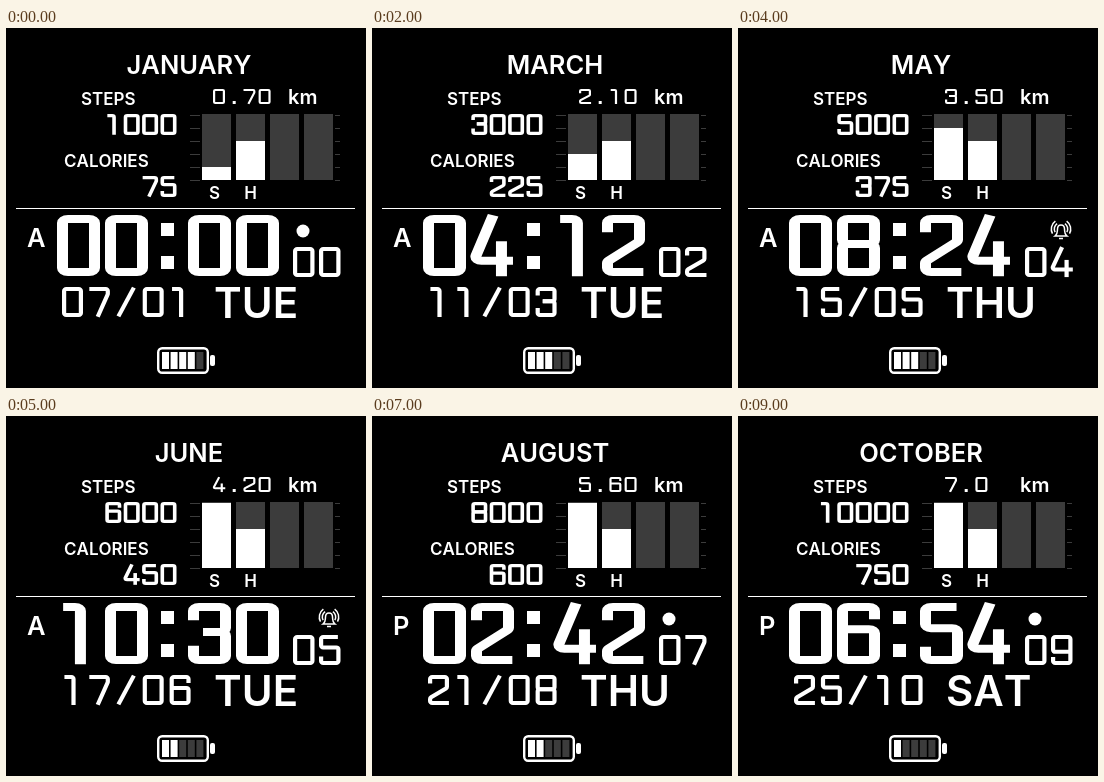
An HTML page with a canvas for the animation above (10 s loop, 360x360 px).

```html
<!DOCTYPE html>
<html lang="en">
<head>
<meta charset="utf-8">
<title>Watch face</title>
<style>
  html, body { margin: 0; width: 100%; height: 100%; overflow: hidden; background: #000; }
  canvas { display: block; width: 360px; height: 360px; }
</style>
</head>
<body>
<canvas id="face" width="360" height="360"></canvas>
<script>
const ctx = document.getElementById('face').getContext('2d');
const WHITE = '#fff', DIM = '#3c3c3c';
const STEP_MS = 1000, STEPS = 10;

const MONTHS = ['JANUARY', 'FEBRUARY', 'MARCH', 'APRIL', 'MAY', 'JUNE', 'JULY',
  'AUGUST', 'SEPTEMBER', 'OCTOBER'];
const DAYS = ['SUN', 'MON', 'TUE', 'WED', 'THU', 'FRI', 'SAT'];

// Square display digits: strokes as "x,y" points in a unit box, "z" closes a stroke.
const GLYPHS = {
  0: '.5,0 1,0 1,1 0,1 0,0 z',
  1: '.02,0 .56,0 .56,1.08',
  2: '0,.25 0,0 1,0 1,.42 0,.8 0,1 1.12,1',
  3: '0,.25 0,0 1,0 1,.47 .3,.47|.3,.47 1,.47 1,1 0,1 0,.73',
  4: '.52,-.07 -.02,.7 -.02,.79 1.14,.79|.78,.42 .78,1.08',
  5: '.97,0 0,0 0,.4 1,.4 1,1 0,1 0,.75',
  6: '1,.23 1,0 0,0 0,1 1,1 1,.42 0,.42',
  7: '-.1,0 1,0 1,.2 .4,1.07',
  8: '.5,0 1,0 1,.47 0,.47 0,0 z|.5,.47 1,.47 1,1 0,1 0,.47 z',
  9: '0,.77 0,1 1,1 1,0 0,0 0,.57 1,.57',
  '/': '.95,-.05 .03,1.05'
};

// w, h: digit size; sw, sh: weight of upright and level strokes.
const BIG = { w: 43, h: 61, sw: 11, sh: 8, pitch: 48 };
const DATE = { w: 21, h: 30, sw: 4.2, sh: 4, pitch: 26.9 };
const SECS = { w: 21.5, h: 30, sw: 4.2, sh: 4, pitch: 26 };
const COUNT = { w: 16, h: 21, sw: 3.6, sh: 3.2, pitch: 18.4 };
const SMALL = { w: 12, h: 15, sw: 2.2, sh: 2, pitch: 15.2 };

const pad = n => String(n).padStart(2, '0');

function rect(x, y, w, h, color = WHITE) {
  ctx.fillStyle = color;
  ctx.fillRect(x, y, w, h);
}

function text(str, x, y, size, align = 'left') {
  ctx.font = `600 ${size}px Inter, sans-serif`;
  ctx.fontKerning = 'none';
  ctx.textAlign = align;
  ctx.fillStyle = WHITE;
  ctx.fillText(str, x, y);
}

function glyph(ch, x, y, f) {
  ctx.save();
  ctx.translate(x, y);
  ctx.scale(f.sw, f.sh);
  ctx.lineWidth = 1;
  ctx.strokeStyle = WHITE;
  for (const stroke of GLYPHS[ch].split('|')) {
    const closed = stroke.endsWith('z');
    const pts = stroke.replace(' z', '').split(' ').map(p => {
      const [u, v] = p.split(',').map(Number);
      return [0.5 + u * (f.w / f.sw - 1), 0.5 + v * (f.h / f.sh - 1)];
    });
    if (closed) pts.push(pts[0]);
    ctx.beginPath();
    ctx.moveTo(...pts[0]);
    for (let i = 1; i < pts.length - 1; i++) ctx.arcTo(...pts[i], ...pts[i + 1], 0.5);
    ctx.lineTo(...pts[pts.length - 1]);
    if (closed) ctx.closePath();
    ctx.stroke();
  }
  ctx.restore();
}

function digits(str, x, y, f) {
  [...str].forEach((ch, i) => {
    const left = x + i * f.pitch;
    if (ch === '.') rect(left + 4.5, y + f.h - 3, 3, 3);
    else glyph(ch, left, y, f);
  });
}

function digitsRight(n, right, y, f) {
  const str = String(n);
  digits(str, right - f.w - (str.length - 1) * f.pitch, y, f);
}

function chart(levels) {
  const top = 86, bottom = 152, unit = 13;
  for (let i = 0; i < 4; i++) {
    const x = 196 + 34 * i, fill = unit * (levels[i] || 0);
    rect(x, top, 29, bottom - top, DIM);
    rect(x, bottom - fill, 29, fill);
  }
  for (let y = top + 1; y <= bottom; y += unit) {
    rect(184, y, 10, 1, DIM);
    rect(329, y, 5, 1, DIM);
  }
  text('S', 208.5, 171, 17, 'center');
  text('H', 244.5, 171, 17, 'center');
}

function bell(x, y) {
  ctx.strokeStyle = WHITE;
  ctx.lineWidth = 1.5;
  ctx.beginPath();
  ctx.moveTo(x - 6, y + 6);
  ctx.quadraticCurveTo(x - 3.5, y + 4, x - 3.5, y - 1);
  ctx.bezierCurveTo(x - 3.5, y - 6.5, x + 3.5, y - 6.5, x + 3.5, y - 1);
  ctx.quadraticCurveTo(x + 3.5, y + 4, x + 6, y + 6);
  ctx.closePath();
  ctx.moveTo(x - 2, y + 8.5);
  ctx.lineTo(x + 2, y + 8.5);
  for (const r of [6.7, 9.7]) {
    for (const [from, to] of [[-0.95, 0.5], [Math.PI - 0.5, Math.PI + 0.95]]) {
      ctx.moveTo(x + r * Math.cos(from), y - 1 + r * Math.sin(from));
      ctx.arc(x, y - 1, r, from, to);
    }
  }
  ctx.stroke();
}

function battery(level) {
  ctx.strokeStyle = WHITE;
  ctx.lineWidth = 2.4;
  ctx.beginPath();
  ctx.roundRect(152.2, 320.2, 49.6, 24.6, 4);
  ctx.stroke();
  ctx.fillStyle = WHITE;
  ctx.beginPath();
  ctx.roundRect(204, 327, 5, 11, 2);
  ctx.fill();
  for (let i = 0; i < 5; i++) rect(156 + 8.6 * i, 324, 7, 17, i < level ? WHITE : DIM);
}

function draw(i) {
  const n = i + 1, minutes = 126 * i, day = 7 + 2 * i;
  const steps = 1000 * n;

  rect(0, 0, 360, 360, '#000');
  text(MONTHS[i], 183, 46, 25.5, 'center');

  text('STEPS', 75, 77, 17);
  digitsRight(steps, 170.5, 86, COUNT);
  text('CALORIES', 58, 139, 17);
  digitsRight(75 * n, 170.5, 148, COUNT);

  digits((0.7 * n).toFixed(n < 10 ? 2 : 1), 207, 61, SMALL);
  text('km', 282, 76, 20);
  chart([Math.min(5, Math.round(steps / 6200 * 5)), 3]);

  rect(10, 180, 339, 1);

  text(minutes < 720 ? 'A' : 'P', 21, 219, 25.5);
  digits(pad(Math.floor(minutes / 60) % 12), 51, 187, BIG);
  rect(155, 195, 13, 13);
  rect(155, 228, 13, 13);
  digits(pad(minutes % 60), 182, 187, BIG);
  digits(pad(i), 287, 219, SECS);

  if (i < 1 || i > 5) {
    ctx.fillStyle = WHITE;
    ctx.beginPath();
    ctx.arc(297, 203, 6.5, 0, 2 * Math.PI);
    ctx.fill();
  }
  if (i >= 4 && i <= 6) bell(323, 202);

  digits(`${pad(day)}/${pad(n)}`, 56, 259, DATE);
  text(DAYS[new Date(2025, i, day).getDay()], 208, 290, 42);

  battery(4 - Math.floor((i + 1) / 3));
}

function tick() {
  draw(Math.floor(performance.now() / STEP_MS) % STEPS);
  requestAnimationFrame(tick);
}
tick();
</script>
</body>
</html>
```
